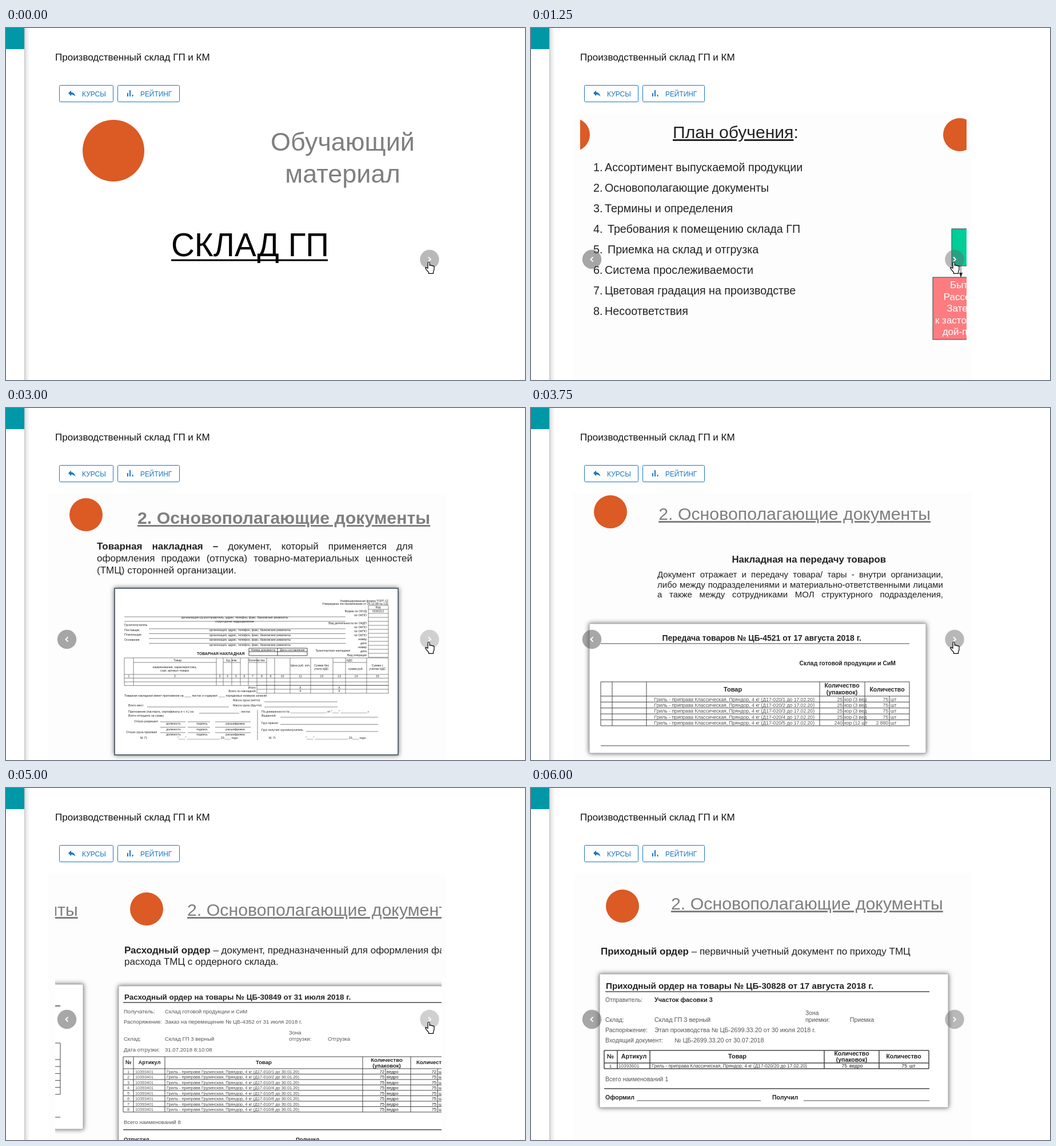
Animation of 908x617 px, one loop 6250 ms. Source, as an HTML page:

```html
<!DOCTYPE html>
<html lang="ru">
<head>
<meta charset="utf-8">
<title>Производственный склад</title>
<style>
html, body { margin: 0; width: 100%; height: 100%; overflow: hidden; background: #fff }
svg { display: block; font-family: "Liberation Sans", Arial, sans-serif; fill: #222 }
.title { fill: #7f7f7f; text-decoration: underline }
.panel { fill: #fff; stroke: #aaa; filter: drop-shadow(0 0 4px #0009) }
.justify { line-height: 20px; text-align: justify; text-align-last: justify; color: #222 }
</style>
</head>
<body>
<svg id="stage" width="908" height="617" viewBox="0 0 908 617"></svg>
<script>
const LOOP = 6250, TICK = 250, VIEW = 676;
const B = 'font-weight="bold"', M = 'text-anchor="middle"', E = 'text-anchor="end"';
const GRAY = 'fill="#555"', GREEN = '#00cd98', RED = '#fd7c80', PEACH = '#fbcb93';

const text = (x, y, size, s, a = '') => `<text x="${x}" y="${y}" font-size="${size}" ${a}>${s}</text>`;
const line = (x1, y1, x2, y2, a = 'stroke="#444"') => `<path d="M${x1} ${y1}L${x2} ${y2}" fill="none" ${a}/>`;
const rect = (x, y, x2, y2, a) => `<rect x="${x}" y="${y}" width="${x2 - x}" height="${y2 - y}" ${a}/>`;
const panel = (x, y, x2, y2, a = '') => rect(x, y, x2, y2, 'class="panel" ' + a);
const dot = (x, y, r) => `<circle cx="${x}" cy="${y}" r="${r}" fill="#dc5a24"/>`;
const logo = (x, y) => dot(x + 44, y + 30, 29);
const title = (x, y, s, a = '') => text(x, y, 30.3, s, 'class="title" ' + a);
const repeat = (n, f) => Array.from({ length: n }, (_, i) => f(i)).join('');
const DOCS = '2. Основополагающие документы';

const justify = (x, y, w, s, size = 17) =>
  `<foreignObject x="${x}" y="${y - 16}" width="${w}" height="21"><div class="justify" style="font-size:${size}px">${s}</div></foreignObject>`;

// White centred lines in a coloured block
function block(x, y, x2, y2, fill, lines, top, gap = 20.5) {
  return rect(x, y, x2, y2, `fill="${fill}" stroke="#444"`) +
    lines.map((s, i) => text((x + x2) / 2, top + i * gap, 17, s, M + ' fill="#fff"')).join('');
}
function badge(x, y, rx, ry, s, yellow) {
  const n = yellow ? 14 : 24, points = repeat(n * 2, i => {
    const a = i * Math.PI / n, k = i % 2 ? .76 : 1;
    return `${(x + rx * k * Math.cos(a)).toFixed(1)},${(y + ry * k * Math.sin(a)).toFixed(1)} `;
  });
  return `<polygon points="${points}" fill="${yellow ? '#ff0' : '#0fa88a'}" stroke="${yellow ? '#cc9' : '#245'}"/>` +
    text(x, y + 6, 17, s, M + ` fill="${yellow ? '#fff6c0' : '#fff'}"`);
}
function arrow(x1, y1, x2, y2) {
  const a = Math.atan2(y2 - y1, x2 - x1) * 180 / Math.PI;
  return line(x1, y1, x2, y2) + `<path d="M0 0L-8 -3V3Z" transform="translate(${x2} ${y2})rotate(${a})"/>`;
}
// Ruled table: column edges, header height, row count and row height
function grid(cols, y, head, n, row, a = 'stroke="#444"') {
  const end = cols[cols.length - 1], bottom = y + head + n * row;
  return cols.map(x => line(x, y, x, bottom, a)).join('') + line(cols[0], y, end, y, a) +
    repeat(n + 1, i => line(cols[0], y + head + i * row, end, y + head + i * row, a));
}
const range = head => logo(130, 157) + title(241, 203, '1. Ассортимент 2018', B) +
  `<polygon points="576,201 613,190 585,171 634,177 643,162 663,174 707,156 709,174 762,180 729,190 745,205 714,207 722,222 690,212 676,226 655,212 622,230 627,211 590,217 612,203" fill="${GREEN}" stroke="#245"/>` +
  text(664, 203, 26, '120', `${B} ${M} fill="#fff"`) +
  block(351, 251, 555, 305, '#dcc3d6', head, 274) +
  arrow(368, 310, 246, 347) + arrow(528, 310, 639, 347);

function cover() {
  return dot(188, 215, 54) + text(589, 215, 45, 'Обучающий', M + ' fill="#7f7f7f"') +
    text(589, 270.5, 45, 'материал', M + ' fill="#7f7f7f"') +
    text(289, 400, 56.6, 'СКЛАД ГП', 'fill="#000"') + rect(289, 405.5, 563, 408.5, 'fill="#000"');
}
function plan() {
  const items = ['Ассортимент выпускаемой продукции', 'Основополагающие документы', 'Термины и определения',
    'Требования к помещению склада ГП', 'Приемка на склад и отгрузка', 'Система прослеживаемости',
    'Цветовая градация на производстве', 'Несоответствия'];
  return logo(30, 157) + text(248, 193, 30.1, '<tspan text-decoration="underline">План обучения</tspan>:') +
    items.map((s, i) => text(109, 251 + i * 36, 19.7, i + 1 + '.') +
      text(i == 3 || i == 4 ? 134 : 129, 251 + i * 36, 19.7, s)).join('');
}
function waterRange() {
  return range(['Продукция на', 'водной основе']) +
    block(160, 352, 411, 417, GREEN, ['Рассолы', 'и маринады'], 380) +
    block(501, 352, 736, 417, GREEN, ['Маринады', 'бытовые'], 380) +
    arrow(176, 417, 176, 437) + arrow(352, 417, 352, 437) + arrow(560, 417, 560, 437) +
    block(127, 437, 221, 546, RED, ['Быт.', 'Рассол', 'Затея', 'к застолью', 'дой-пак'], 456) +
    block(308, 437, 394, 513, PEACH, ['Пром.', 'рассол'], 472) +
    block(501, 437, 613, 513, PEACH, ['Пром.', 'маринады'], 472) +
    block(690, 437, 784, 513, RED, ['Быт.', 'Затея', 'к застолью'], 461) +
    badge(771, 449, 26, 16, '1') + badge(771, 612, 26, 16, '1');
}
function oilRange() {
  return range(['Продукция на', 'масляной основе']) +
    block(160, 352, 411, 433, GREEN, ['Корейские', 'заправки'], 388) +
    block(501, 352, 736, 433, GREEN, ['Маринады', 'серии', 'Люкс'], 378) +
    arrow(186, 433, 186, 518) + arrow(352, 433, 352, 513) + arrow(560, 433, 560, 502) + arrow(720, 433, 720, 502) +
    block(154, 518, 240, 582, PEACH, ['Пром.', 'КЗ'], 546) + badge(250, 537, 32, 19, '10+4', true) +
    block(308, 513, 394, 582, RED, ['Быт.', 'КЗ'], 543) + badge(405, 513, 26, 17, '10') +
    block(501, 502, 613, 577, RED, ['Крылья', 'Затея', 'к застолью'], 525) + badge(610, 493, 29, 19, '1') +
    block(666, 502, 774, 577, PEACH, ['Пром.', 'маринады'], 535) + badge(757, 515, 32, 18, '18+4', true);
}
function waybill() {
  const thin = 'stroke="#555" stroke-width=".7"';
  const rule = (x, x2, y) => line(x, y, x2, y, thin);
  const cols = [207, 223, 368, 380, 395, 410, 424, 439, 456, 470, 497, 533, 572, 594, 631, 669];
  const small = (x, y, s, a = '') => text(x, y, 5.2, s, a);
  return logo(96, 157) + title(230, 203, DOCS, B) +
    justify(159, 249, 553, '<b>Товарная накладная –</b> документ, который применяется для') +
    justify(159, 270, 552, 'оформления продажи (отпуска) товарно-материальных ценностей') +
    text(159, 290, 17, '(ТМЦ) сторонней организации.') +
    panel(190, 316, 686, 608, 'style="stroke:#345;stroke-width:1.5"') +
    small(669, 340, 'Унифицированная форма ТОРГ-12', E) + small(669, 345, 'Утверждена постановлением от 25.12.98 № 132', E) +
    grid([634, 669], 346, 7, 12, 7, thin) + small(651, 351, 'Код', M) + small(651, 358, '0330212', M) +
    ['Форма по ОКУД', 'по ОКПО', '', 'Вид деятельности по ОКДП', 'по ОКПО', 'по ОКПО', 'по ОКПО', 'номер', 'дата', 'номер', 'дата', 'Вид операции']
      .map((s, i) => small(631, 358 + i * 7, s, E)).join('') +
    small(602, 427, 'Транспортная накладная', E) +
    rule(207, 594, 366) + rule(207, 594, 374) +
    ['Грузополучатель', 'Поставщик', 'Плательщик', 'Основание'].map((s, i) => {
      const y = 382 + i * 8.5;
      return small(207, y, s) + rule(250, 594, y + 5) + small(427, y + 9, 'организация, адрес, телефон, факс, банковские реквизиты', M);
    }).join('') +
    small(400, 369, 'организация-грузоотправитель, адрес, телефон, факс, банковские реквизиты', M) +
    small(400, 376, 'структурное подразделение', M) +
    text(334, 433, 6.8, 'ТОВАРНАЯ НАКЛАДНАЯ', B) + grid([425, 475, 527], 421, 6, 1, 7) +
    small(450, 426, 'Номер документа', M) + small(501, 426, 'Дата составления', M) +
    grid(cols, 438, 29, 3, 6.5, thin) + rule(223, 368, 446) + rule(380, 410, 446) + rule(424, 456, 446) + rule(572, 631, 446) +
    grid([439, 456, 470, 497, 533, 572, 594, 631, 669], 486, 7, 1, 7, thin) +
    repeat(15, i => small((cols[i] + cols[i + 1]) / 2, 472, i + 1, M)) +
    small(300, 444, 'Товар', M) + small(295, 456, 'наименование, характеристика,', M) + small(295, 462, 'сорт, артикул товара', M) +
    small(395, 444, 'Ед. изм.', M) + small(439, 444, 'Количество', M) + small(601, 444, 'НДС', M) +
    small(515, 453, 'Цена руб. коп.', M) + small(552, 453, 'Сумма без', M) + small(552, 459, 'учета НДС', M) +
    small(612, 459, 'сумма руб.', M) + small(650, 453, 'Сумма с', M) + small(650, 459, 'учетом НДС', M) +
    small(437, 492, 'Итого', E) + small(437, 498, 'Всего по накладной', E) +
    repeat(4, i => small(i % 2 ? 583 : 515, i < 2 ? 492 : 498, 'X', M)) +
    small(207, 506, 'Товарная накладная имеет приложение на ____ листах и содержит ____ порядковых номеров записей') +
    small(397, 514, 'Масса груза (нетто)') + rule(452, 580, 515) + small(397, 523, 'Масса груза (брутто)') + rule(452, 580, 524) +
    small(214, 523, 'Всего мест') + rule(247, 390, 524) +
    small(214, 534, 'Приложение (паспорта, сертификаты и т. п.) на') + rule(338, 408, 535) + small(411, 534, 'листах') +
    small(214, 541, 'Всего отпущено на сумму') + line(440, 529, 440, 582, thin) +
    repeat(3, i => repeat(3, j => rule(270 + j * 48, (j == 2 ? 428 : 314 + j * 43), 550 + i * 9.5) +
      small(293 + j * 50 + (j == 2 ? 8 : 0), 555 + i * 9.5, ['должность', 'подпись', 'расшифровка'][j], M))) +
    small(224, 551, 'Отпуск разрешил') + small(210, 570, 'Отпуск груза произвел') +
    small(447, 534, 'По доверенности № ______________________ от "____" ________________ г.') +
    ['Выданной', 'Груз принял', 'Груз получил грузополучатель'].map((s, i) =>
      small(447, 541 + i * 12.5, s) + rule(i == 2 ? 525 : 480, 651, 542 + i * 12.5)).join('') +
    small(235, 580, 'М. П.') + small(300, 580, '"____" ____________________ 20____ года') +
    small(460, 580, 'М. П.') + small(524, 580, '"____" ____________________ 20____ года');
}
function transfer() {
  const cols = [-270, -250, -190, 113, 192, 270];
  return logo(-297, 152) + title(307, 196, DOCS, E) +
    text(229, 271, 16.8, 'Накладная на передачу товаров', B + ' ' + E) +
    justify(-171, 298, 500, 'Документ отражает и передачу товара/ тары - внутри организации,', 15) +
    justify(-171, 316, 500, 'либо между подразделениями и материально-ответственными лицами', 15) +
    justify(-171, 333, 500, 'а также между сотрудниками МОЛ структурного подразделения,', 15) +
    panel(-290, 378, 299, 605) +
    text(186, 408, 14, 'Передача товаров № ЦБ-4521 от 17 августа 2018 г.', B + ' ' + E) + line(-270, 413, 270, 413) +
    text(246, 451, 10.4, 'Склад готовой продукции и СиМ', B + ' ' + E) +
    grid(cols, 480, 25, 5, 10.4) + text(152, 490, 10.5, 'Количество', B + ' ' + M) +
    text(152, 502, 10.5, '(упаковок)', B + ' ' + M) + text(231, 497, 10.5, 'Количество', B + ' ' + M) +
    text(-39, 497, 11, 'Товар', B + ' ' + M) +
    repeat(5, i => {
      const y = 513.5 + i * 10.4;
      return text(104, y, 8.6, `Гриль - приправа Классическая, Пряндор, 4 кг (Д17-020/${i + 1} до 17.02.20)`, GRAY + ' ' + E) +
        text(153, y, 8.5, i < 4 ? '25' : '240', GRAY + ' ' + E) + text(156, y, 8.5, i < 4 ? 'кор (3 вед' : 'кор (12 шт', GRAY) +
        text(233, y, 8.5, i < 4 ? '75' : '2 880', GRAY + ' ' + E) + text(237, y, 8.5, 'шт', GRAY);
    }) + line(154.5, 505, 154.5, 557) + line(235, 505, 235, 557) + line(-270, 592, 270, 592);
}
function order() {
  return logo(400, 182) + title(524, 224, DOCS) +
    text(404, 290, 17, `<tspan ${B}>Заказ на перемещение</tspan> используется для фиксации`) +
    text(404, 310, 17, 'потребностей в перемещении товаров между складами') +
    panel(400, 344, 1009, 598) + text(419, 376, 15.4, 'Заказ на перемещение № ЦБ-4553 от 17 августа 2018 г.', B) +
    line(419, 382, 969, 382, 'stroke="#444" stroke-width="1.5"') +
    text(419, 406, 10.2, 'Организация:', GRAY) + text(489, 406, 10.7, 'Ладвенс', B) +
    text(419, 427, 10.2, 'Отправитель:', GRAY) + text(489, 427, 11, 'Склад ГП 3 верный', B) +
    text(697, 427, 10.2, 'Получатель:', GRAY) + text(770, 427, 10.7, 'Склад готовой продукции', B) +
    grid([417, 440, 510, 800, 885, 969], 447, 29, 5, 12.2) +
    text(428, 466, 11, '№', B + ' ' + M) + text(475, 466, 10.9, 'Артикул', B + ' ' + M) + text(654, 466, 11, 'Товар', B + ' ' + M) +
    repeat(5, i => {
      const y = 485.5 + i * 12.2;
      return text(428, y, 8.5, i + 1, M + ' ' + GRAY) + text(442, y, 8.4, i < 4 ? '10393601' : '10385301', GRAY) +
        text(513, y, 8.7, i < 4 ? `Гриль - приправа Классическая, Пряндор, 4 кг (Д17-020/${i + 14} до 17.02.20)`
          : 'Набор для салата из Фунчозы "ЛУМ-ЛУМ" (Д17-011/2 до 02.20)', 'fill="#444"');
    }) + text(419, 573, 10.5, 'Менеджер', B) + line(503, 577, 969, 577);
}
function issue() {
  return logo(202, 182) + title(317, 224, DOCS) +
    text(207, 290, 17, `<tspan ${B}>Расходный ордер</tspan> – документ, предназначенный для оформления факта`) +
    text(207, 310, 17, 'расхода ТМЦ с ордерного склада.') +
    panel(197, 347, 807, 650) + text(207, 371, 13.4, 'Расходный ордер на товары № ЦБ-30849 от 31 июля 2018 г.', B) +
    line(205, 376, 792, 376, 'stroke="#444" stroke-width="1.5"') +
    [[395, 'Получатель:', 'Склад готовой продукции и СиМ'], [413, 'Распоряжение:', 'Заказ на перемещение № ЦБ-4352 от 31 июля 2018 г.'],
      [443, 'Склад:', 'Склад ГП 3 верный'], [462, 'Дата отгрузки:', '31.07.2018 8:10:08']]
      .map(([y, k, v]) => text(206, y, 9.5, k, GRAY) + text(278, y, 9.6, v, GRAY)).join('') +
    text(495, 432, 9.5, 'Зона', GRAY) + text(495, 443, 9.5, 'отгрузки:', GRAY) + text(563, 443, 9.5, 'Отгрузка', GRAY) +
    grid([205, 223, 278, 624, 708, 792], 471, 21, 8, 9.5) + line(664, 492, 664, 568) + line(755, 492, 755, 568) +
    text(214, 484, 9.5, '№', B + ' ' + M) + text(251, 484, 9.5, 'Артикул', B + ' ' + M) + text(451, 484, 9.5, 'Товар', B + ' ' + M) +
    text(666, 480, 9.5, 'Количество', B + ' ' + M) + text(666, 490, 9.5, '(упаковок)', B + ' ' + M) + text(718, 484, 9.5, 'Количество', B) +
    repeat(8, i => {
      const y = 499.5 + i * 9.5, n = i ? 75 : 72;
      return text(214, y, 7.5, i + 1, M + ' ' + GRAY) + text(226, y, 7.2, '10393401', GRAY) +
        text(281, y, 7.4, `Гриль - приправа Грузинская, Пряндор, 4 кг (Д17-010/${i + 1} до 30.01.20)`, 'fill="#444"') +
        text(662, y, 7.5, n, E) + text(666, y, 7.5, 'ведро') + text(753, y, 7.5, n, E) + text(757, y, 7.5, 'шт');
    }) + text(206, 589, 9.5, 'Всего наименований 8', GRAY) + line(205, 599, 792, 599, 'stroke="#444" stroke-width="1.5"') +
    text(206, 619, 9.5, 'Отпустил', B) + text(507, 619, 9.5, 'Получил', B);
}
function receipt() {
  const thick = 'stroke="#444" stroke-width="1.5"';
  return logo(116, 177) + title(245, 213, DOCS) +
    text(122, 292, 17, `<tspan ${B}>Приходный ордер</tspan> – первичный учетный документ по приходу ТМЦ`) +
    panel(120, 326, 730, 560) + text(131, 352, 15.2, 'Приходный ордер на товары № ЦБ-30828 от 17 августа 2018 г.', B) +
    line(130, 357, 697, 357, thick) +
    text(130, 375, 10.3, 'Отправитель:', GRAY) + text(216, 375, 10.9, 'Участок фасовки 3', B) +
    text(130, 410, 10.3, 'Склад:', GRAY) + text(216, 410, 10.9, 'Склад ГП 3 верный', GRAY) +
    text(480, 398, 10.3, 'Зона', GRAY) + text(480, 410, 10.3, 'приемки:', GRAY) + text(558, 410, 10.3, 'Приемка', GRAY) +
    text(130, 428, 10.5, 'Распоряжение:', GRAY) + text(216, 428, 10.9, 'Этап производства № ЦБ-2699.33.20 от 30 июля 2018 г.', GRAY) +
    text(130, 446, 10.5, 'Входящий документ:', GRAY) + text(251, 446, 10.7, '№ ЦБ-2699.33.20 от 30.07.2018', GRAY) +
    grid([128, 151, 208, 513, 609, 696], 460, 22, 1, 10, thick) +
    text(139, 474, 11, '№', B + ' ' + M) + text(180, 474, 10.9, 'Артикул', B + ' ' + M) + text(361, 474, 11, 'Товар', B + ' ' + M) +
    text(561, 469, 10.5, 'Количество', B + ' ' + M) + text(561, 480, 10.5, '(упаковок)', B + ' ' + M) + text(652, 474, 10.5, 'Количество', B + ' ' + M) +
    text(139, 490, 8, '1', M) + text(153, 490, 8.2, '10393601', GRAY) +
    text(211, 490, 8.2, 'Гриль - приправа Классическая, Пряндор, 4 кг (Д17-020/20 до 17.02.20)', 'fill="#444"') +
    text(553, 490, 8.5, '75', E) + text(557, 490, 8.5, 'ведро') + text(658, 490, 8.5, '75', E) + text(662, 490, 8.5, 'шт') +
    text(130, 514, 10.5, 'Всего наименований 1', GRAY) + line(128, 527, 697, 527, thick) +
    text(130, 546, 10.5, 'Оформил', B) + line(185, 548, 402, 548) + text(422, 546, 10.5, 'Получил', B) + line(477, 548, 697, 548);
}

// Each slide with the shift its coordinates carry
const slides = [[cover, 0], [plan, -66], [waterRange, 34], [oilRange, 34], [waybill, 0],
  [transfer, -392], [order, 284], [issue, 86], [receipt, 0]];
const button = (id, x, d) => `<g id="${id}"><circle cx="${x}" cy="405.5" r="16.7" fill="#505050" fill-opacity=".5"/>
  <path d="M${x - d * 2} 401.5l${d * 4} 4l${-d * 4} 4" fill="none" stroke="#fff" stroke-width="1.8"/></g>`;

stage.innerHTML = `<defs><clipPath id="view"><rect x="86" y="148" width="${VIEW}" height="469"/></clipPath>
  <linearGradient id="edge"><stop stop-color="#c4c4c4"/><stop offset=".3" stop-color="#e8e8e8"/><stop offset="1" stop-color="#fff"/></linearGradient></defs>
  ${rect(0, 0, 908, 617, 'fill="#fff"')}${rect(32, 0, 42, 617, 'fill="url(#edge)"')}${rect(0, 0, 32, 37, 'fill="#0097a7"')}
  ${text(86, 57, 17, 'Производственный склад ГП и КМ', 'fill="#111"')}
  <g fill="#1976c5"><g fill="none" stroke="#1976c5"><rect x="93.5" y="100.5" width="94" height="29" rx="2"/><rect x="195.5" y="100.5" width="108" height="29" rx="2"/></g>
  <path d="M109 114l5-4.5v3q6 .5 7.500 7.500q-3-3.600-7.500-3.600v3Z"/><path d="M212 114h2v6h-2zM216 109h2v11h-2zM220.500 117h2v3h-2z"/>
  ${text(133, 119.5, 12, 'КУРСЫ')}${text(235, 119.5, 11.9, 'РЕЙТИНГ')}</g>
  <rect id="tint" x="74" y="149" width="697" height="468" fill="#fdfdfd"/>
  <g clip-path="url(#view)"><g id="track">${slides.map(([f, shift], i) => `<g transform="translate(${i * VIEW - shift})">${f()}</g>`).join('')}</g></g>
  ${button('prev', 106.5, -1)}${button('next', 741, 1)}
  <path id="hand" d="M738 421v-9q0-2 1.500-2t1.700 2v4q1.500-1 2.500.5q1.600-1 2.500.6q2.500-.8 2.800 1.700v5l-1.500 4v2.500h-8v-2l-5-6q-1.500-2.500 0-2.700z" fill="#fff" stroke="#000" stroke-width="1.200"/>`;

const at = (slide, px) => slide + px / VIEW;
const stops = [0, 0, 0, .7, 1, at(1, 66), 2, 2, 2, at(3, -34), 3, at(3, 50), 4, 4, 4.6, 5, 5,
  at(6, -284), 6, 6, at(7, -86), 7, 7.6, 8, 8];
const byId = id => document.getElementById(id);
const disc = byId('next').firstElementChild;

function draw(now) {
  const tick = Math.floor(now % LOOP / TICK);
  byId('track').setAttribute('transform', `translate(${-stops[tick] * VIEW})`);
  byId('prev').style.display = tick > 2 ? '' : 'none';
  byId('tint').style.display = tick > 4 ? '' : 'none';
  byId('hand').style.display = tick < 24 ? '' : 'none';
  const light = tick > 6 && tick < 14 || tick > 18 && tick < 24;
  disc.setAttribute('fill', light ? '#c8c8c8' : '#646464');
  disc.setAttribute('fill-opacity', light ? .85 : .45);
  requestAnimationFrame(draw);
}
draw(0);
</script>
</body>
</html>
```
